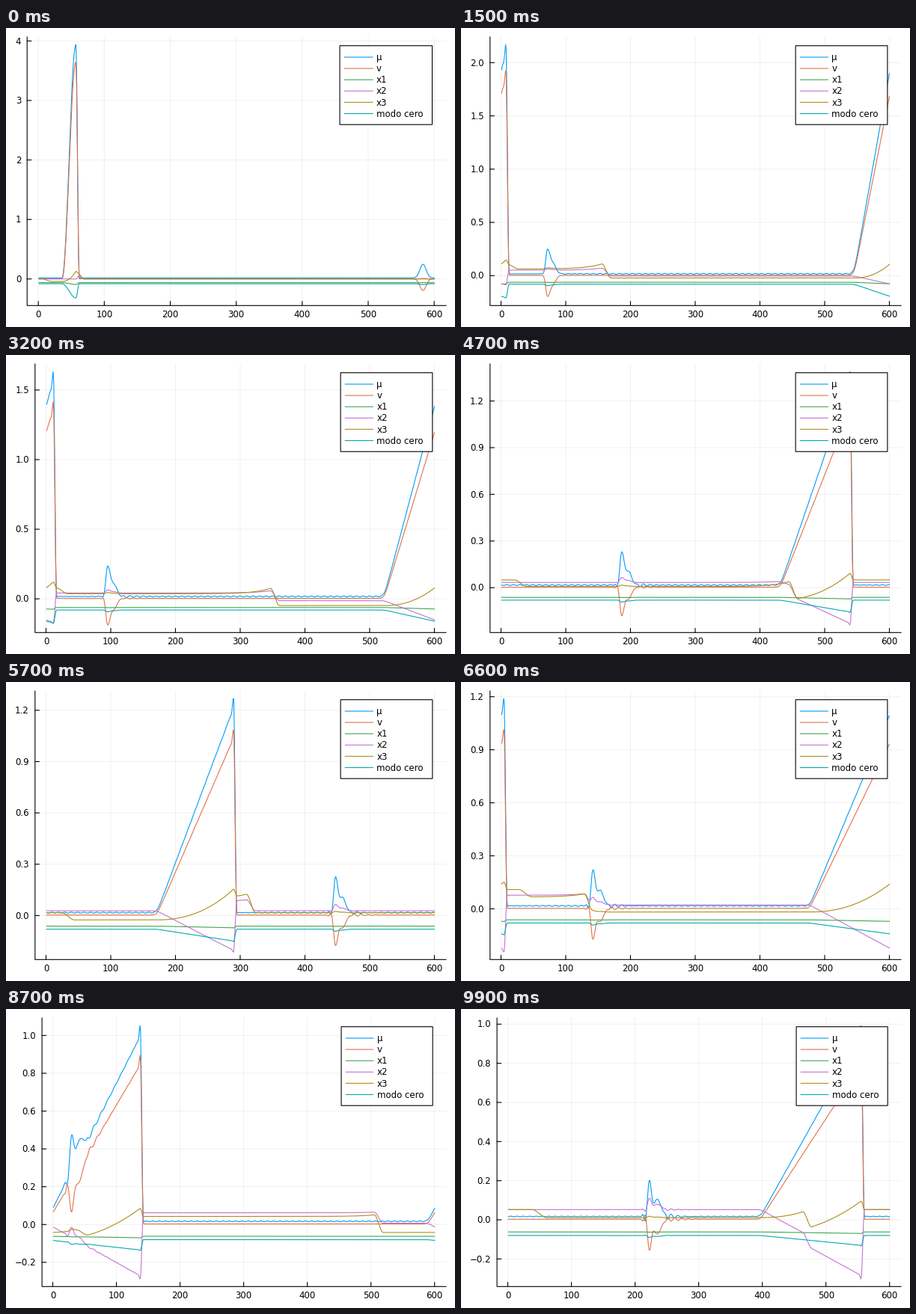
A matplotlib script that plays this animation: 600 by 400 pixels, repeating every 10 s.

```python
import numpy as np
import matplotlib.pyplot as plt
from matplotlib.animation import FuncAnimation
from matplotlib.patches import Rectangle

W, H, DPI, FRAMES = 600, 400, 100, 100
PX = 72 / DPI
TOP, BOTTOM, RIGHT = 12, 371.3, 588
PERIOD = 600
SERIES = {"μ": "#009afa", "v": "#e36f47", "x1": "#3ea44e",
          "x2": "#c371d2", "x3": "#ac8e18", "modo cero": "#00aaae"}

plt.rcParams["font.family"] = "DejaVu Sans"
plt.rcParams["font.size"] = 8.5

x = np.arange(1, PERIOD + 1)


def smooth(s):
    s = np.clip(s, 0, 1)
    return s * s * (3 - 2 * s)


def gauss(d, sigma):
    return np.exp(-0.5 * (d / sigma) ** 2)


def dist(c):
    """Signed distance from c on the ring."""
    return (x - c + PERIOD / 2) % PERIOD - PERIOD / 2


def step(c, w):
    """Unit jump on the ring; jumps that sum to zero leave flat levels."""
    d = dist(c)
    return smooth(d / w + 0.5) - 0.5 - d / PERIOD


def centred(y, mean):
    return y - y.mean() + mean


def right_wave(t, young):
    """Steepening triangle: foot, front, unit ramp and unit curved tooth."""
    foot = 36 + 33.95 * t
    size = np.sqrt(441 + 226 * t + 0.23 * t * t)
    d = (x - foot + 100) % PERIOD - 100
    fall = 1 - smooth((d - size) / 5)
    early = np.sin(np.pi / 2 * np.clip(d / size, 0, 1)) ** 2
    line = 2 * np.log1p(np.exp(d / 2))
    late = 0.91 * np.minimum(line / (size - 5), 1) + 0.09 * gauss(d - size, 1.6)
    ramp = (young * early + (1 - young) * late) * fall
    tooth = np.clip(d / size, 0, 1) ** 2.2 * fall
    return foot, foot + size, ramp, tooth


def left_wave(t, young, age):
    """Small pulse that grows a shoulder and ripples."""
    d = dist(580.5 + 2.5 * young - 33.92 * t)
    width = np.where(d < 0, 2.6 + 2.1 * young, 4.2 - 1.2 * age + 0.5 * young)
    y = (0.23 - 0.055 * age) * gauss(d, width)
    y += 0.087 * (1 - young) * gauss(d - 8.5 - 4 * age, 4 + 2 * age)
    y += age * (0.012 * gauss(d + 10, 1.5) - 0.035 * gauss(d + 6.5, 1.5))
    tail = np.cos(2 * np.pi * (d - 29) / 11) * np.exp(-np.maximum(d - 29, 0) / 18)
    return y - 0.016 * age * tail * smooth((d - 22) / 5)


def series(t):
    young, age = np.exp(-t / 2.5), t / FRAMES
    foot, front, ramp, tooth = right_wave(t, young)
    pulse = left_wave(t, young, age)
    tri = ramp / np.sqrt(0.065 + 0.0099 * t)

    behind = (foot - x) % PERIOD
    ripple = (0.0045 * (1 - young) * (1 - 0.6 * age)
              * np.sin(2 * np.pi * behind / 10))
    ripple *= 1 - smooth((behind - 400) / 120) + 0.6 * smooth(ramp * 8)
    ripple *= ramp < 0.88

    mu = 0.017 + tri + pulse + ripple
    v = (0.003 + (0.86 + 0.068 * np.exp(-t / 20)) * tri - 0.86 * pulse
         + 0.7 * ripple * (ramp > 0.02))
    x1 = -0.062 - 0.008 * tri - 0.006 * pulse
    zero = -0.08 - (0.061 - 0.006 * age) * (tri + pulse)

    # fast step shared by x2 and x3, with a swell ahead of the drop
    fast, w = 65 + 46.52 * t, 14 - 6 * young
    d = dist(fast) + w / 2
    swell = (0.05 * (1 - young) * np.exp(-(t / 65) ** 2)
             * np.exp(np.minimum(d, 0) / 25) * (1 - smooth(d / w)))
    lift, drop = step(front + 2.5, 5), step(fast, w)

    x2 = 0.055 * (lift - drop) + 0.4 * swell
    x2 += 0.32 * age * pulse - (0.0061 - 0.000031 * t) * t * ramp
    x2 = centred(x2, 0.007 * (1 - young))

    slow = step(13 + 0.37 * t, 14 + 0.1 * t)
    x3 = 0.17 * tooth + 0.127 * lift - 0.085 * drop - 0.042 * slow
    x3 = centred(x3 + swell + 0.04 * pulse, 0.007 * (1 - young) + 0.013 * age)
    return [mu, v, x1, x2, x3, zero]


def nice_ticks(lo, hi):
    """Score round steps by tick count, coverage and niceness."""
    best, choice = -1, None
    for scale in (0.01, 0.1, 1):
        for q, nice in ((1, 1), (5, .9), (2, .7), (2.5, .5), (3, .2)):
            gap = q * scale
            first, last = int(np.ceil(lo / gap)), int(np.floor(hi / gap))
            n = last - first + 1
            if not 4 <= n <= 8:
                continue
            score = (.25 * (1 - abs(n - 5) / 5)
                     + .5 * (hi - lo) / ((n - 1) * gap) + .25 * nice)
            if score > best:
                best, choice = score, (gap, first, last)
    gap, first, last = choice
    digits = next(k for k in range(4) if abs(round(gap, k) - gap) < 1e-9)
    vals = [i * gap for i in range(first, last + 1)]
    return vals, [f"{u:.{digits}f}".replace("-", "−") for u in vals]


def text_width(s):
    return sum({".": 3.5, "−": 9.3}.get(c, 7.1) for c in s)


fig = plt.figure(figsize=(W / DPI, H / DPI), dpi=DPI, facecolor="white")
ax = fig.add_axes([0, 0, 1, 1])


def line(xs, ys, color="black", width=1.1, **kw):
    ax.plot(xs, ys, color=color, lw=width * PX, snap=False, **kw)


def label(px, py, s, ha="left", **kw):
    ax.text(px, py + 4.2, s, ha=ha, va="baseline", **kw)


def legend(width):
    right = RIGHT - 0.033 * width
    dash = 0.0675 * width
    left = right - 85.7 - dash
    ax.add_patch(Rectangle((left, 23.7), right - left, 105.5, fc="white",
                           ec="black", lw=1.1 * PX, snap=False, zorder=5))
    for i, (name, color) in enumerate(SERIES.items()):
        y = 39 + 15.1 * i
        line([left + 6.2, left + 6.2 + dash], [y, y], color, zorder=6)
        label(left + 11.2 + dash, y, name, zorder=6)


def draw(t):
    ax.clear()
    ax.set(xlim=(0, W), ylim=(H, 0))
    ax.axis("off")

    data = series(t)
    lo, hi = np.min(data), np.max(data)
    pad = 0.03 * (hi - lo)
    lo, hi = lo - pad, hi + pad
    vals, names = nice_ticks(lo, hi)
    left = 21.1 + max(map(text_width, names))
    width = RIGHT - left

    def to_x(u):
        return left + (u + 16.97) / 634.94 * width

    def to_y(u):
        return BOTTOM - (u - lo) / (hi - lo) * (BOTTOM - TOP)

    for u in range(0, PERIOD + 1, 100):
        p = to_x(u)
        line([p, p], [TOP, BOTTOM], width=1, alpha=0.06)
        line([p, p], [BOTTOM, BOTTOM - 5.5])
        label(p, 382.6, str(u), "center")
    for u, name in zip(vals, names):
        p = to_y(u)
        line([left, RIGHT], [p, p], width=1, alpha=0.06)
        line([left, left + 5.5], [p, p])
        label(left - 8, p, name, "right")
    line([left, left, RIGHT], [TOP, BOTTOM, BOTTOM])

    for y, color in zip(data, SERIES.values()):
        line(to_x(x), to_y(y), color, zorder=3)
    legend(width)
    return []


anim = FuncAnimation(fig, draw, frames=FRAMES, interval=100, repeat=True)
plt.show()
```
